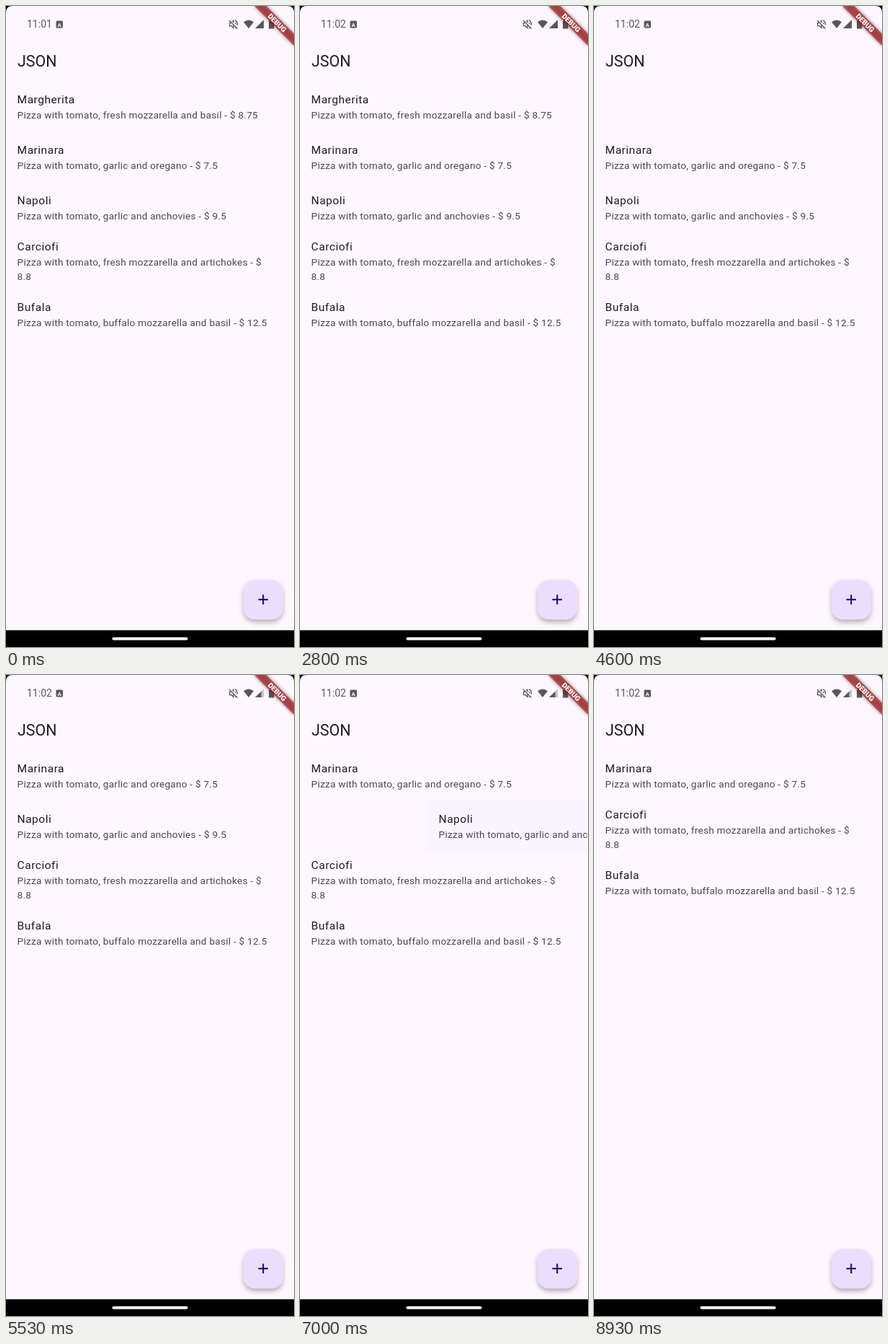
Animation of 400 by 889 pixels, one loop 9 s. Source, as an HTML page:

```html
<!DOCTYPE html>
<html lang="en">
<head>
<meta charset="utf-8">
<title>JSON pizza list</title>
<style>
  html, body { margin: 0; width: 100%; height: 100%; overflow: hidden; background: #000; }
  svg { display: block; width: 100%; height: 100%; font-family: Roboto, sans-serif; }
  .status { fill: #5a575c; }
  .name { font-size: 15.56px; letter-spacing: .486px; fill: #1d1b20; }
  .info { font-size: 13.61px; letter-spacing: .243px; fill: #49454f; }
</style>
</head>
<body>
<svg viewBox="0 0 400 889">
  <defs>
    <clipPath id="screen"><path d="M0 865.7V9Q0 0 9 0H391Q400 0 400 9V865.7Z"/></clipPath>
    <filter id="fabShadow" x="-40%" y="-40%" width="180%" height="190%">
      <feDropShadow dx="0" dy="4" stdDeviation="3.5" flood-color="#000" flood-opacity=".3"/>
    </filter>
    <filter id="blur" x="-20%" y="-80%" width="140%" height="260%">
      <feGaussianBlur stdDeviation="2.8"/>
    </filter>
  </defs>
  <rect width="400" height="889"/>
  <g clip-path="url(#screen)">
    <rect width="400" height="866" fill="#fef7ff"/>

    <g class="status">
      <text id="clock" x="29" y="30" font-size="14"></text>
      <rect x="69.5" y="20.5" width="9.5" height="10" rx="1.5"/>
      <text x="74.25" y="28.6" font-size="8" font-weight="700" text-anchor="middle" fill="#fef7ff">A</text>
      <path d="M310 20L321.5 31.5M312.5 23.5H310.5V27.5H313L316 30.5V26M314.3 21.8L316 20.3V23.2M318 19.9Q321.8 21.5 321.4 26.5M318 23.2Q319.3 24 319.2 25.2M318 30.8L319.5 30"
        fill="none" stroke="#5a575c" stroke-width="1.3"/>
      <path d="M337 31L330 22.3Q337 16.6 344 22.3Z"/>
      <path d="M346 31L358 19.3V31Z" opacity=".35"/>
      <path id="signal"/>
      <path d="M366.8 20.5V19H370.6V20.5H372.4V31.5H365V20.5Z"/>
    </g>

    <text x="16" y="84" font-size="21.4" fill="#1d1b20">JSON</text>
    <g id="list"></g>
    <path id="spinner" fill="none" stroke="#6750a4" stroke-width="3.9" stroke-linecap="square"/>

    <rect x="330" y="796" width="54.5" height="54.5" rx="15.5" fill="#eaddff" filter="url(#fabShadow)"/>
    <path d="M350.4 823.2H364M357.2 816.4V830" stroke="#21005d" stroke-width="2"/>

    <g transform="translate(400 0) rotate(45)">
      <rect x="-39" y="27.2" width="78" height="11.7" opacity=".5" filter="url(#blur)"/>
      <rect x="-39" y="27.2" width="78" height="11.7" fill="#b71c1c" opacity=".63"/>
      <text x="0" y="36.5" font-size="9.9" font-weight="900" text-anchor="middle" fill="#fff">DEBUG</text>
    </g>
  </g>
  <rect x="147.5" y="875.5" width="105" height="3.9" rx="1.95" fill="#fff"/>
</svg>
<script>
const LOOP = 9000, FPS = 15;
const LOADING = [190, 1920];
const CLOCK_CHANGE = 660, SIGNAL_CHANGE = 4930;
const ROW_HEIGHT = 70;

// Title baseline, name, then subtitle lines; "swipe" is when a row starts to move.
const pizzas = [
  { y: 135, name: 'Margherita', info: ['Pizza with tomato, fresh mozzarella and basil - $ 8.75'], swipe: 3870 },
  { y: 205, name: 'Marinara', info: ['Pizza with tomato, garlic and oregano - $ 7.5'] },
  { y: 275, name: 'Napoli', info: ['Pizza with tomato, garlic and anchovies - $ 9.5'], swipe: 6640 },
  { y: 339, name: 'Carciofi', info: ['Pizza with tomato, fresh mozzarella and artichokes - $', '8.8'] },
  { y: 423, name: 'Bufala', info: ['Pizza with tomato, buffalo mozzarella and basil - $ 12.5'] },
];

// Drag path: time after the start, horizontal offset.
const drag = [[0, 0], [110, 25], [230, 90], [360, 177], [490, 275], [620, 400]];
const RESIZE = [740, 920];

const $ = id => document.getElementById(id);
const clamp = v => Math.min(1, Math.max(0, v));
const progress = (t, [from, to]) => clamp((t - from) / (to - from));

function bezier(x1, y1, x2, y2) {
  const at = (a, b, s) => 3 * a * s * (1 - s) ** 2 + 3 * b * s * s * (1 - s) + s ** 3;
  return x => {
    let lo = 0, hi = 1;
    for (let i = 0; i < 24; i++) {
      const mid = (lo + hi) / 2;
      if (at(x1, x2, mid) < x) lo = mid; else hi = mid;
    }
    return at(y1, y2, (lo + hi) / 2);
  };
}
const ease = bezier(.25, .1, .25, 1);
const fastOutSlowIn = bezier(.4, 0, .2, 1);

function follow(path, t) {
  const i = path.findIndex(([time]) => time > t);
  if (i === 0) return path[0][1];
  if (i < 0) return path[path.length - 1][1];
  const [a, b] = [path[i - 1], path[i]];
  return a[1] + (b[1] - a[1]) * progress(t, [a[0], b[0]]);
}

function add(parent, tag, attributes, content = '') {
  const node = document.createElementNS('http://www.w3.org/2000/svg', tag);
  for (const [key, value] of Object.entries(attributes)) node.setAttribute(key, value);
  node.textContent = content;
  parent.append(node);
  return node;
}

for (const pizza of pizzas) {
  const { y, name, info } = pizza;
  pizza.row = add($('list'), 'g', {});
  pizza.panel = add(pizza.row, 'rect', { y: y - 30.5, width: 400, height: ROW_HEIGHT, fill: '#f9f4fd' });
  add(pizza.row, 'text', { class: 'name', x: 15.6, y }, name);
  info.forEach((line, i) => add(pizza.row, 'text', { class: 'info', x: 15.6, y: y + 21.2 + 19.5 * i }, line));
}

function spinnerPath(t) {
  const phase = t / 1333 % 1, turn = t / 2222 % 1;
  const head = fastOutSlowIn(clamp(phase * 2));
  const tail = fastOutSlowIn(clamp(phase * 2 - 1));
  const start = Math.PI * (-.5 + 1.5 * tail + 2 * turn + .5 * phase);
  const sweep = Math.max(1.5 * Math.PI * (head - tail), .001);
  const radius = 17.5;
  const point = a => `${17.5 + radius * Math.cos(a)} ${122.3 + radius * Math.sin(a)}`;
  return `M${point(start)}A${radius} ${radius} 0 ${+(sweep > Math.PI)} 1 ${point(start + sweep)}`;
}

function draw(t) {
  const loading = t >= LOADING[0] && t < LOADING[1];
  $('clock').textContent = t < CLOCK_CHANGE ? '11:01' : '11:02';
  $('signal').setAttribute('d', t < SIGNAL_CHANGE ? 'M346 31L358 19.3V31Z' : 'M346 31L354.5 22.7V31Z');
  $('list').style.display = loading ? 'none' : '';
  $('spinner').setAttribute('d', loading ? spinnerPath(t - LOADING[0]) : '');

  let lift = 0;
  for (const { row, panel, swipe = Infinity } of pizzas) {
    const dx = follow(drag, t - swipe);
    row.setAttribute('transform', `translate(${dx} ${-lift})`);
    panel.style.display = dx > 0 ? '' : 'none';
    if (t > swipe) lift += ROW_HEIGHT * ease(progress(t - swipe, RESIZE));
  }
}

const origin = performance.now();
function tick() {
  const t = (performance.now() - origin) % LOOP;
  draw(Math.floor((t + 4) * FPS / 1000) * 1000 / FPS % LOOP);
  requestAnimationFrame(tick);
}
tick();
</script>
</body>
</html>
```
